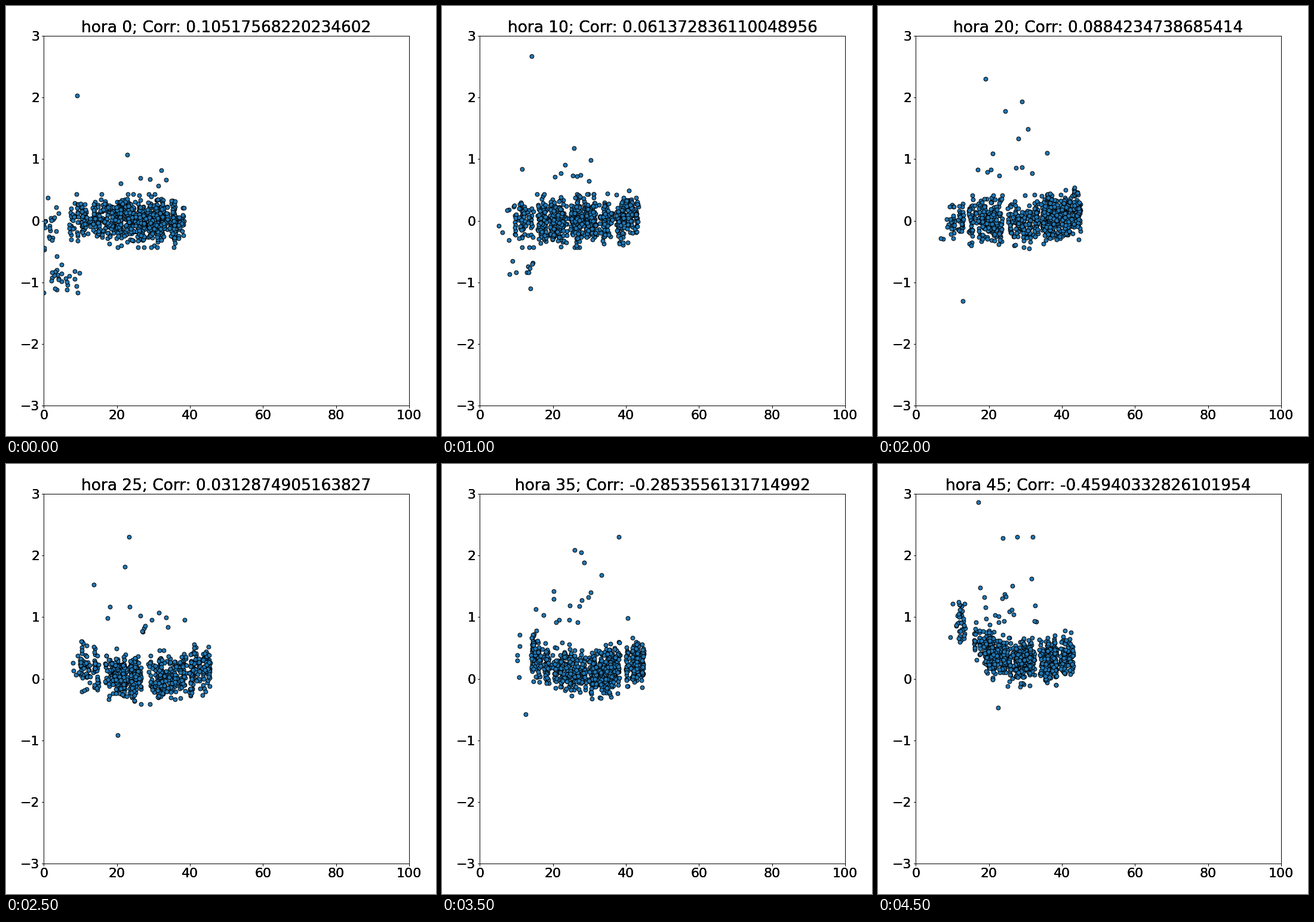
These frames come from a looping animation (720 by 720 pixels, 5 s). A matplotlib script:

```python
import numpy as np
import matplotlib.pyplot as plt
from matplotlib.animation import FuncAnimation

plt.rcParams["font.family"] = "DejaVu Sans"
plt.rcParams["font.size"] = 22

STEP = 5             # hours per picture
POINTS = 900
COLUMNS = 75
LAYERS = 3           # stacked axes give the heavy lettering

CORR = [
    "0.10517568220234602", "0.07924618350271946", "0.061372836110048956",
    "0.20168737723244778", "0.0884234738685414", "0.0312874905163827",
    "-0.10713865470586348", "-0.2853556131714992", "-0.3846102957318264",
    "-0.45940332826101954",
]

# Values at key hours; other hours are interpolated.
KEYS = [0, 10, 15, 20, 30, 35, 45]
TRACKS = dict(
    left=[5, 8.5, 9, 9, 10.5, 11, 11.5],
    right=[39.3, 43.5, 45.3, 45.7, 45.7, 45, 43.6],
    base=[0, 0, -0.04, -0.02, 0.06, 0.1, 0.28],
    bend_left=[0, 0, 0, 0, 0.0009, 0.0014, 0.0021],
    bend_right=[0, 0.0004, 0.0011, 0.0006, 0.0008, 0.0008, 0.0005],
    top_x=[9.1, 14.2, 12, 29, 17.7, 26, 17.2],
    top_y=[2.03, 2.67, 2.84, 1.93, 2.67, 2.09, 2.86],
    low_x=[0, 13.9, 12.2, 12.9, 27.7, 12.5, 22.6],
    low_y=[-1.17, -1.1, -1.19, -1.3, -0.53, -0.58, -0.47],
)


def at(name, hour):
    return np.interp(hour, KEYS, TRACKS[name])


def curve(x, hour):
    """Valley with its floor near x = 29 and one bend per side."""
    d = x - 29
    bend = np.where(d < 0, at("bend_left", hour), at("bend_right", hour))
    return at("base", hour) + bend * d ** 2


def main_cloud(hour, rng):
    """Vertical columns of points scattered around the curve."""
    left, right = at("left", hour), at("right", hour)
    columns = left + (right - left) * rng.beta(1.5, 1.2, COLUMNS)
    x = rng.choice(columns, POINTS) + rng.normal(0, 0.2, POINTS)
    x = np.where(x > right, 2 * right - x, x)
    noise = np.clip(rng.normal(0, 0.165, POINTS), -0.43, 0.43)
    return x, curve(x, hour) + noise


def warm_group(hour, rng):
    """Loose points above the cloud that climb hour by hour."""
    n = 7 + hour // 3
    x = np.clip(rng.normal(26, 6, n), 10, 44)
    y = 0.55 + 0.008 * hour + rng.exponential(0.22 + 0.006 * hour, n)
    return x, np.minimum(y, 2.3)


def cold_group(hour, rng):
    """Points below the cloud that thin out and drift right."""
    n = max(24 - 3 * hour // 2, 0)
    x = rng.uniform(2, 10, n) + 0.6 * hour
    return x, rng.normal(-0.93 + 0.013 * hour, 0.1, n)


def edge_group(hour, rng):
    """Sparse points between the axis and the cloud."""
    n = max(22 - 2 * hour, 5)
    x = at("left", hour) * rng.beta(0.6 + 0.3 * hour, 1, n)
    return x, curve(x, hour) + rng.normal(-0.1, 0.25, n)


def lone_points(hour, rng):
    return ([at("top_x", hour), at("low_x", hour)],
            [at("top_y", hour), at("low_y", hour)])


def scene(hour):
    rng = np.random.default_rng(hour + 1)
    groups = (main_cloud, warm_group, cold_group, edge_group, lone_points)
    return np.hstack([make(hour, rng) for make in groups]).T


def heading(i):
    return f"hora {STEP * i}; Corr: {CORR[i]}"


fig, ax = plt.subplots(figsize=(10, 10), dpi=72)
ax.set(xlim=(0, 100), ylim=(-3, 3), title=heading(0))
fig.tight_layout()
dots = ax.scatter([], [], s=46, color="C0", edgecolors="black", linewidths=1)

layers = [ax]
for k in range(1, LAYERS):
    layers.append(fig.add_axes(ax.get_position(), label=f"layer {k}",
                               facecolor="none", xlim=(0, 100), ylim=(-3, 3)))


def draw(i):
    dots.set_offsets(scene(STEP * i))
    for layer in layers:
        layer.set_title(heading(i))
    return [dots]


anim = FuncAnimation(fig, draw, frames=len(CORR), interval=500, repeat=True,
                     repeat_delay=0, blit=False)
plt.show()
```
